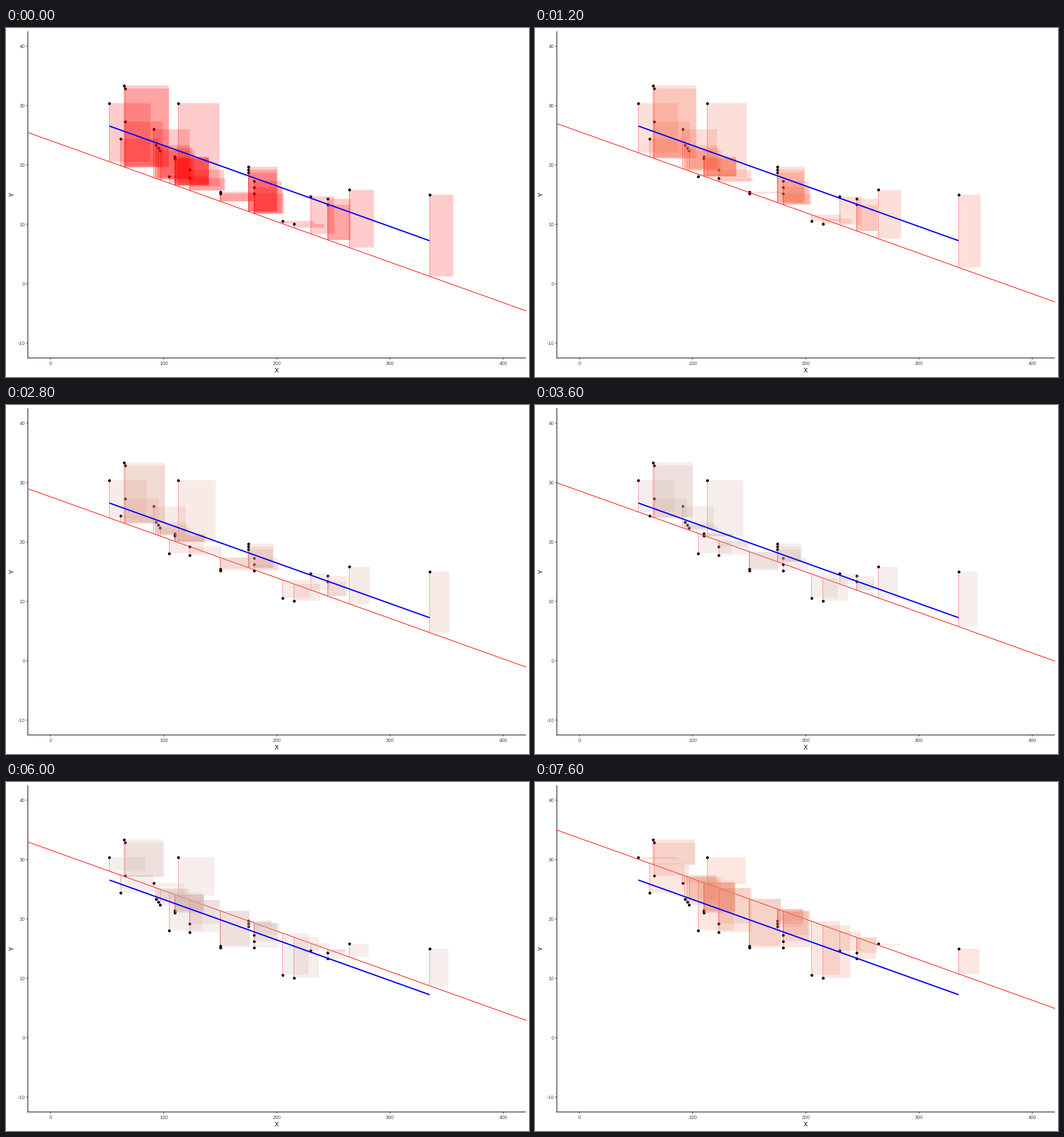
These frames come from a looping animation (917 by 611 pixels, 8 s). A matplotlib script:

```python
import numpy as np
import matplotlib.pyplot as plt
from matplotlib.animation import FuncAnimation
from matplotlib.collections import LineCollection, PolyCollection

W, H, DPI = 917, 611, 72
LEFT, RIGHT, TOP, BOTTOM = 38.3, 911.5, 5.8, 577.7
X_RANGE, Y_RANGE = (-20, 420), (-12.5, 42.5)
FRAMES, INTERVAL = 20, 400
SLOPE, INTERCEPT = -0.06823, 30.099


def sample_points():
    """Outliers, points on a hyperbola and evenly filled columns."""
    points = [(52, 30.4), (62, 24.4), (66, 27.3), (91, 26), (105, 18.1),
              (113, 30.4), (230, 14.7), (264, 15.8), (335, 15)]
    points += [(x, 2170 / x) for x in (65, 66, 93, 95, 97, 205, 215)]
    columns = [(110, 21, 21.4, 4), (123, 17.8, 19.2, 2), (150, 15.2, 15.5, 2),
               (175, 18.7, 19.7, 3), (180, 15.2, 17.3, 3), (245, 13.3, 14.3, 2)]
    for x, low, high, count in columns:
        points += [(x, y) for y in np.linspace(low, high, count)]
    return np.array(points).T


def fill_color(shift):
    """Grey at the best fit, bending towards pure red at a shift of 6."""
    t = (abs(shift) / 6) ** 1.35
    grey = 190 / 255
    return (1 - (1 - grey) * (1 - t) ** 1.8,
            grey * (1 - t) ** 0.58,
            grey * (1 - t) ** 0.92,
            0.2)


def px(x):
    return LEFT + (x - X_RANGE[0]) / (X_RANGE[1] - X_RANGE[0]) * (RIGHT - LEFT)


def py(y):
    return BOTTOM - (y - Y_RANGE[0]) / (Y_RANGE[1] - Y_RANGE[0]) * (BOTTOM - TOP)


plt.rcParams["font.family"] = "Liberation Sans"
fig = plt.figure(figsize=((W + 0.01) / DPI, (H + 0.01) / DPI), dpi=DPI,
                 facecolor="white")
stage = fig.add_axes([0, 0, 1, 1])
stage.set(xlim=(0, W), ylim=(H, 0))
stage.axis("off")
ax = fig.add_axes([LEFT / W, 1 - BOTTOM / H,
                   (RIGHT - LEFT) / W, (BOTTOM - TOP) / H])
ax.set(xlim=X_RANGE, ylim=Y_RANGE)
ax.axis("off")


def stroke(x, y, color):
    stage.plot(x, y, color=color, lw=1.07, solid_capstyle="butt", snap=False)


def label(x, y, text, **style):
    stage.text(x, y, text, va="baseline", **style)


stroke([LEFT, LEFT], [TOP, BOTTOM + 0.5], "black")
stroke([LEFT - 0.5, RIGHT], [BOTTOM, BOTTOM], "black")
tick_text = dict(fontsize=8.8, color="#4d4d4d")
for v in range(0, 401, 100):
    stroke([px(v)] * 2, [BOTTOM, BOTTOM + 2.75], "#333333")
    label(px(v), 590, str(v), ha="center", **tick_text)
for v in range(-10, 41, 10):
    stroke([LEFT - 2.75, LEFT], [py(v)] * 2, "#333333")
    label(33.3, py(v) + 3.4, str(v), ha="right", **tick_text)
label((LEFT + RIGHT) / 2, 603, "X", ha="center", fontsize=11)
label(13.8, (TOP + BOTTOM) / 2, "Y", ha="center", fontsize=11,
      rotation=90, rotation_mode="anchor")

xs, ys = sample_points()
fitted = INTERCEPT + SLOPE * xs
widths = fitted + abs(ys - fitted)

residuals = LineCollection([], colors=[(1, 0, 0, 0.4)], linewidths=1.07,
                           zorder=1, snap=False)
ax.plot(xs, ys, "o", color="black", ms=5, mew=0, zorder=2)
trial, = ax.plot([], [], color="red", lw=1.07, zorder=3)
boxes = PolyCollection([], linewidths=0, zorder=4, snap=False)
ax.add_collection(residuals, autolim=False)
ax.add_collection(boxes, autolim=False)
fit_x = np.array([xs.min(), xs.max()])
ax.plot(fit_x, INTERCEPT + SLOPE * fit_x, color="blue", lw=2.2,
        solid_capstyle="butt", zorder=5)


def update(frame):
    shift = -6 + 0.5 * frame
    line_x = np.array(X_RANGE)
    trial.set_data(line_x, INTERCEPT + shift + SLOPE * line_x)
    predicted = fitted + shift
    ends = xs + widths + abs(shift)
    boxes.set_verts([[(x, y), (end, y), (end, p), (x, p)]
                     for x, y, end, p in zip(xs, ys, ends, predicted)])
    boxes.set_facecolor(fill_color(shift))
    residuals.set_segments([[(x, y), (x, p)]
                            for x, y, p in zip(xs, ys, predicted)])
    return residuals, trial, boxes


anim = FuncAnimation(fig, update, frames=FRAMES, interval=INTERVAL,
                     repeat=True, repeat_delay=0, blit=False)
plt.show()
```
